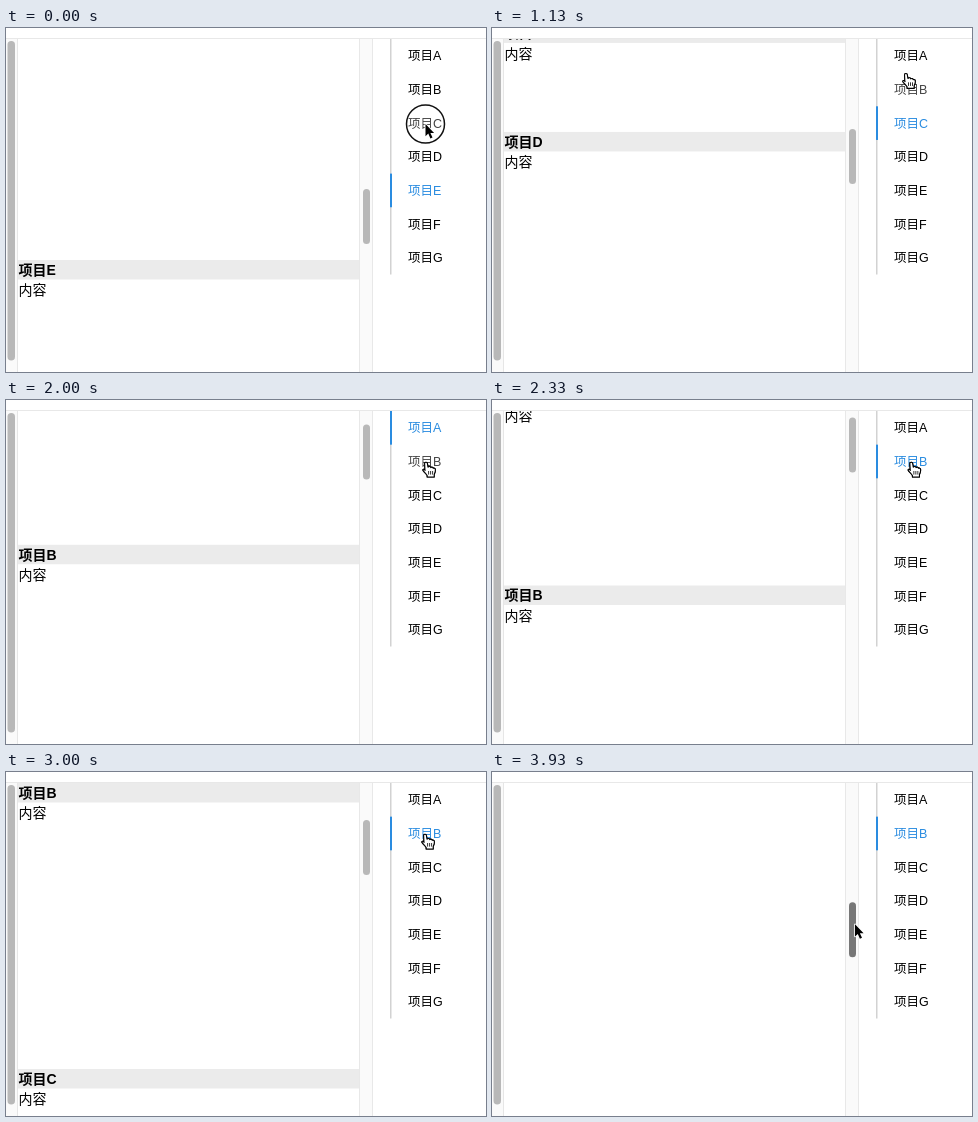
Animation, 480 px wide and 344 px high, one loop 3990 ms. Source, as an HTML page with a canvas:

```html
<!DOCTYPE html>
<html lang="zh-CN">
<head>
<meta charset="utf-8">
<style>
  html, body { margin: 0; width: 100%; height: 100%; overflow: hidden; background: #fff; }
  canvas { display: block; }
</style>
</head>
<body>
<canvas id="stage" width="480" height="344"></canvas>
<script>
const ctx = document.getElementById('stage').getContext('2d');
const LOOP = 3990, TOP = 11, ROW = 33.65, BLUE = '#2a8ce0';
const FONT = '"Liberation Sans", "Noto Sans CJK SC", "Noto Sans CJK", sans-serif';
const NAMES = [...'ABCDEFG'];

// Section offsets, measured from section B
const SECTIONS = { A: -200, B: 0, C: 286, D: 394.5, E: 865 };
const SCROLL_TIME = 590, DRAG_START = 3600, DRAG_TIME = 330;
const CLICKS = [
  { item: 2, press: 0, release: 560, scroll: 628, from: 644, to: 286 },
  { item: 0, press: 1400, release: 1495, scroll: 1565, from: 286, to: -200 },
  { item: 1, press: 2135, release: 2165, scroll: 2182, from: -200, to: 0 },
];
const CURSOR = [
  [0, 419.5, 96], [930, 419.5, 96], [1230, 412, 28], [1780, 412, 28], [1980, 420, 62],
  [2500, 419, 62], [3150, 419, 62], [3480, 360, 70], [3600, 360, 70],
];
const HAND = new Path2D('M-1 8.4L-1.4 1.6C-1.4-.2 1.2-.2 1.4 1.4L2 5.2C3 4 4.6 4.4 4.8 5.6' +
  'C5.8 4.8 7 5.2 7.2 6.3C8.4 5.8 9.4 6.5 9.4 7.8C9.4 10.5 8.6 11 8.2 12.5V15H1.2V13.5' +
  'C0 11.5-2 10-3 8.4C-3.4 7-1.8 6.8-.8 8.2Z');
const FINGERS = new Path2D('M2.6 9v3.6M4.6 9v3.6M6.6 9v3.6');
const ARROW = new Path2D('M0 0V12.2L2.8 9.6L4.9 14.4L7 13.5L4.9 8.9H8.6Z');

const clamp = v => Math.min(1, Math.max(0, v));
const smooth = p => p * p * (3 - 2 * p);
const easeInOut = p => p < .5 ? 2 * p * p : 1 - 2 * (1 - p) ** 2;
const dragAt = t => 82 * Math.max(0, (t - DRAG_START) / DRAG_TIME) ** 1.15;

function scrollAt(t) {
  if (t > DRAG_START) return dragAt(t) * 5.7;
  const c = CLICKS.findLast(c => t >= c.scroll) || CLICKS[0];
  return c.from + (c.to - c.from) * easeInOut(clamp((t - c.scroll) / SCROLL_TIME));
}

function cursorAt(t) {
  if (t >= DRAG_START) return [360 + 3 * clamp((t - DRAG_START) / 150), 70 + dragAt(t)];
  const i = CURSOR.findIndex(k => k[0] > t);
  const [t0, x0, y0] = CURSOR[i - 1], [t1, x1, y1] = CURSOR[i];
  const p = smooth((t - t0) / (t1 - t0));
  return [x0 + (x1 - x0) * p, y0 + (y1 - y0) * p];
}

function rect(x, y, w, h, color) {
  ctx.fillStyle = color;
  ctx.fillRect(x, y, w, h);
}

function text(str, x, y, size, color, weight = 'normal') {
  ctx.font = `${weight} ${size}px ${FONT}`;
  ctx.fillStyle = color;
  ctx.fillText(str, x, y);
}

function pill(x, y, w, h, color) {
  ctx.fillStyle = color;
  ctx.beginPath();
  ctx.roundRect(x, y, w, h, w / 2);
  ctx.fill();
}

function drawSections(scroll) {
  ctx.save();
  ctx.beginPath();
  ctx.rect(12, TOP, 341, 344 - TOP);
  ctx.clip();
  for (const name in SECTIONS) {
    const y = TOP + SECTIONS[name] - scroll;
    rect(12, y, 341, 19.5, '#ebebeb');
    text('项目' + name, 12.5, y + 15, 14, '#000', 'bold');
    text('内容', 12.5, y + 35.2, 14, '#000');
  }
  ctx.restore();
}

function drawBars(scroll, held) {
  rect(0, TOP, 11, 333, '#fafafa');
  rect(11, TOP, 1, 333, '#e6e6e6');
  rect(353, TOP, 14, 333, '#fafafa');
  rect(353, TOP, 1, 333, '#e8e8e8');
  rect(366, TOP, 1, 333, '#e8e8e8');
  rect(0, 10, 480, 1, '#e8e8e8');
  pill(1.5, 13, 7.5, 319.5, '#b8b8b8');
  pill(357, 48 + scroll / 5.7, 7, 55, held ? '#777' : '#b8b8b8');
}

function drawMenu(active, hover) {
  rect(384, TOP, 1.5, 235.5, '#d2d2d2');
  rect(384, TOP + active * ROW, 2, ROW, BLUE);
  NAMES.forEach((name, i) => {
    const color = i === active ? BLUE : i === hover ? '#444' : '#000';
    text('项目' + name, 402, 32.4 + i * ROW, 12.5, color);
  });
}

function drawRing(x, y, r, alpha) {
  ctx.globalAlpha = alpha;
  ctx.strokeStyle = '#111';
  ctx.lineWidth = 1.5;
  ctx.beginPath();
  ctx.arc(x, y, r, 0, 7);
  ctx.stroke();
  ctx.globalAlpha = 1;
}

function drawCursor(x, y, hand) {
  ctx.save();
  ctx.translate(x, y);
  ctx.lineJoin = 'round';
  ctx.lineWidth = hand ? 1.1 : 1.6;
  ctx.strokeStyle = hand ? '#000' : '#fff';
  ctx.fillStyle = hand ? '#fff' : '#000';
  const shape = hand ? HAND : ARROW;
  ctx.stroke(shape);
  ctx.fill(shape);
  if (hand) {
    ctx.stroke(shape);
    ctx.lineWidth = .8;
    ctx.stroke(FINGERS);
  }
  ctx.restore();
}

function draw(t) {
  const scroll = scrollAt(t), [x, y] = cursorAt(t);
  const active = (CLICKS.findLast(c => t >= c.release + 15) || { item: 4 }).item;
  const overMenu = x > 386;
  rect(0, 0, 480, 344, '#fff');
  drawSections(scroll);
  drawBars(scroll, t > 3460);
  drawMenu(active, overMenu ? Math.floor((y - TOP) / ROW) : -1);

  // Press ring, which grows and fades on release
  for (const c of CLICKS) {
    const p = clamp((t - c.release) / 100);
    if (t >= c.press && p < 1) drawRing(x, y, 19 + 9 * p, 1 - p);
  }
  if (t >= 3530 && t < 3925) drawRing(x, y, 19, 1);
  drawCursor(x, y, overMenu && t >= 590);
}

const start = performance.now();
function tick() {
  draw((performance.now() - start) % LOOP);
  requestAnimationFrame(tick);
}
tick();
</script>
</body>
</html>
```
